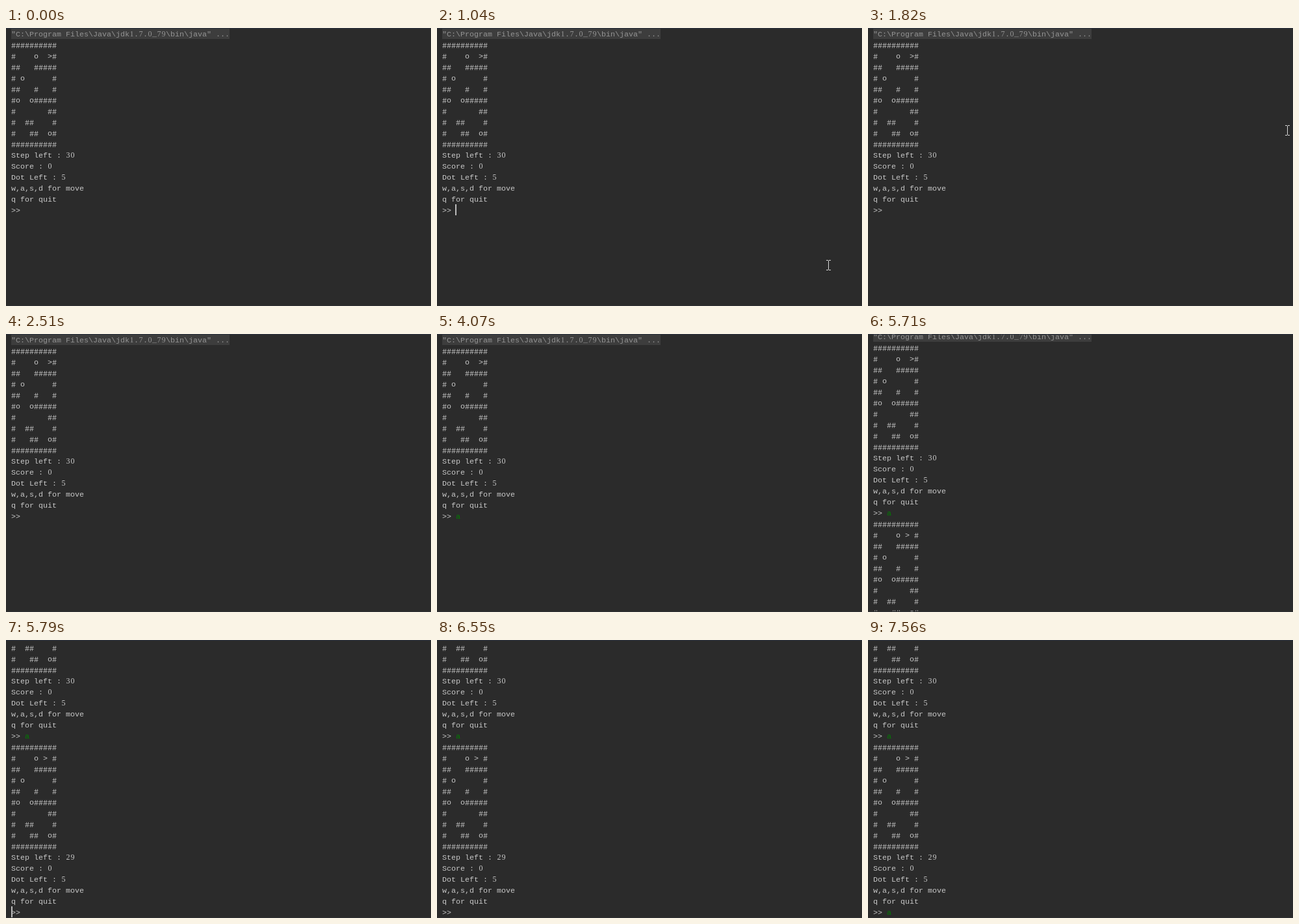
An HTML page with a canvas for the animation above (8000 ms loop, 654 by 429 pixels).

```html
<!DOCTYPE html>
<html lang="en">
<head>
<meta charset="utf-8">
<title>Console maze game</title>
<style>
  html, body { margin: 0; width: 100%; height: 100%; overflow: hidden; background: #2b2b2b; }
  canvas { display: block; }
</style>
</head>
<body>
<canvas id="stage" width="654" height="429"></canvas>
<script>
const ctx = document.getElementById('stage').getContext('2d', { alpha: false });
const W = 654, H = 429, LOOP = 8000;
const LEFT = 8, ROW = 17, COL = 7, BASELINE = 13;
const MONO = `${COL / 0.6}px "Liberation Mono", monospace`;
const DIGIT = '12px "Liberation Serif", serif';
const HASH = '13px "Liberation Serif", serif';
const COMMAND = String.raw`"C:\Program Files\Java\jdk1.7.0_79\bin\java" ...`;
const INPUT_ROWS = [16, 32];

const turn = (firstLine, steps) => [
  '##########',
  firstLine,
  '##   #####',
  '# o      #',
  '##   #   #',
  '#o  o#####',
  '#       ##',
  '#  ##    #',
  '#   ##  o#',
  '##########',
  `Step left : ${steps}`,
  'Score : 0',
  'Dot Left : 5',
  'w,a,s,d for move',
  'q for quit',
  '>>'
];
const firstTurn = turn('#    o  >#', 30);
const secondTurn = turn('#    o > #', 29);

// Visible caret intervals: start, end, x, row
const carets = [
  [1040, 1520, 28, 16],
  [2050, 2510, 28, 16],
  [3060, 3460, 28, 16],
  [3460, 4070, 35, 16],
  [4530, 5080, 35, 16],
  [5560, 5710, 8, 17],
  [5790, 6550, 8, 32],
  [7010, 7560, 35, 32]
];

function rect(x, y, w, h, color) {
  ctx.fillStyle = color;
  ctx.fillRect(x, y, w, h);
}

function fontFor(char) {
  if (char === '#') return HASH;
  return /\d/.test(char) ? DIGIT : MONO;
}

// Console cells have a fixed pitch; plain zeros and tall hashes come from the serif face.
function text(str, col, row, color = '#c8c8c8') {
  ctx.fillStyle = color;
  [...str].forEach((char, i) => {
    const drop = char === '#' ? 1 : 0;
    ctx.font = fontFor(char);
    ctx.fillText(char, LEFT + (col + i + 0.5) * COL, row * ROW + BASELINE + drop);
  });
}

function scrollAt(t) {
  if (t < 5710) return 0;
  return t < 5790 ? 5 : 133;
}

function pointerAt(t) {
  if (t >= 500 && t < 580) return [593, 426];
  if (t < 890 || t >= 2280) return null;
  if (t < 970) return [599, 421];
  if (t < 1040) return [602, 388];
  if (t < 1440) return [602, 366];
  // The pointer sweeps up along an arc in eleven even hops.
  const hop = Math.min(10, Math.floor((t - 1440 + 6) / 77)) - 5;
  const u = hop < 0 ? hop / 6 : hop / 5;
  return hop < 0
    ? [Math.round(645 - 43 * u * u), Math.round(158 - 208 * u)]
    : [Math.round(645 - 107 * u * u), Math.round(158 - 154 * u)];
}

function drawPointer([x, y]) {
  const color = '#d8d8d8';
  rect(x, y - 7, 1, 14, color);
  for (const edge of [y - 8, y + 7]) {
    rect(x - 3, edge, 3, 1, color);
    rect(x + 1, edge, 3, 1, color);
  }
}

function drawConsole(t) {
  ctx.save();
  ctx.beginPath();
  ctx.rect(0, 1, W, H - 2);
  ctx.clip();
  ctx.translate(0, -scrollAt(t));

  rect(LEFT, 0, COMMAND.length * COL, ROW, '#3d3d3d');
  text(COMMAND, 0, 0, '#949494');
  firstTurn.forEach((line, i) => text(line, 0, i + 1));
  if (t >= 5710) secondTurn.forEach((line, i) => text(line, 0, i + 17));
  if (t >= 3460) text('a', 3, INPUT_ROWS[0], '#007f00');
  if (t >= 7010) text('a', 3, INPUT_ROWS[1], '#007f00');

  const caret = carets.find(([start, end]) => t >= start && t < end);
  if (caret) rect(caret[2], caret[3] * ROW, 2, ROW, '#bbbbbb');
  ctx.restore();
}

function draw(t) {
  rect(0, 0, W, H, '#2b2b2b');
  rect(0, 0, W, 1, '#29303c');
  rect(0, H - 1, W, 1, '#303234');
  drawConsole(t);
  const pointer = pointerAt(t);
  if (pointer) drawPointer(pointer);
}

ctx.textAlign = 'center';
ctx.textBaseline = 'alphabetic';

const start = performance.now();
function frame() {
  draw((performance.now() - start) % LOOP);
  requestAnimationFrame(frame);
}
frame();
</script>
</body>
</html>
```
